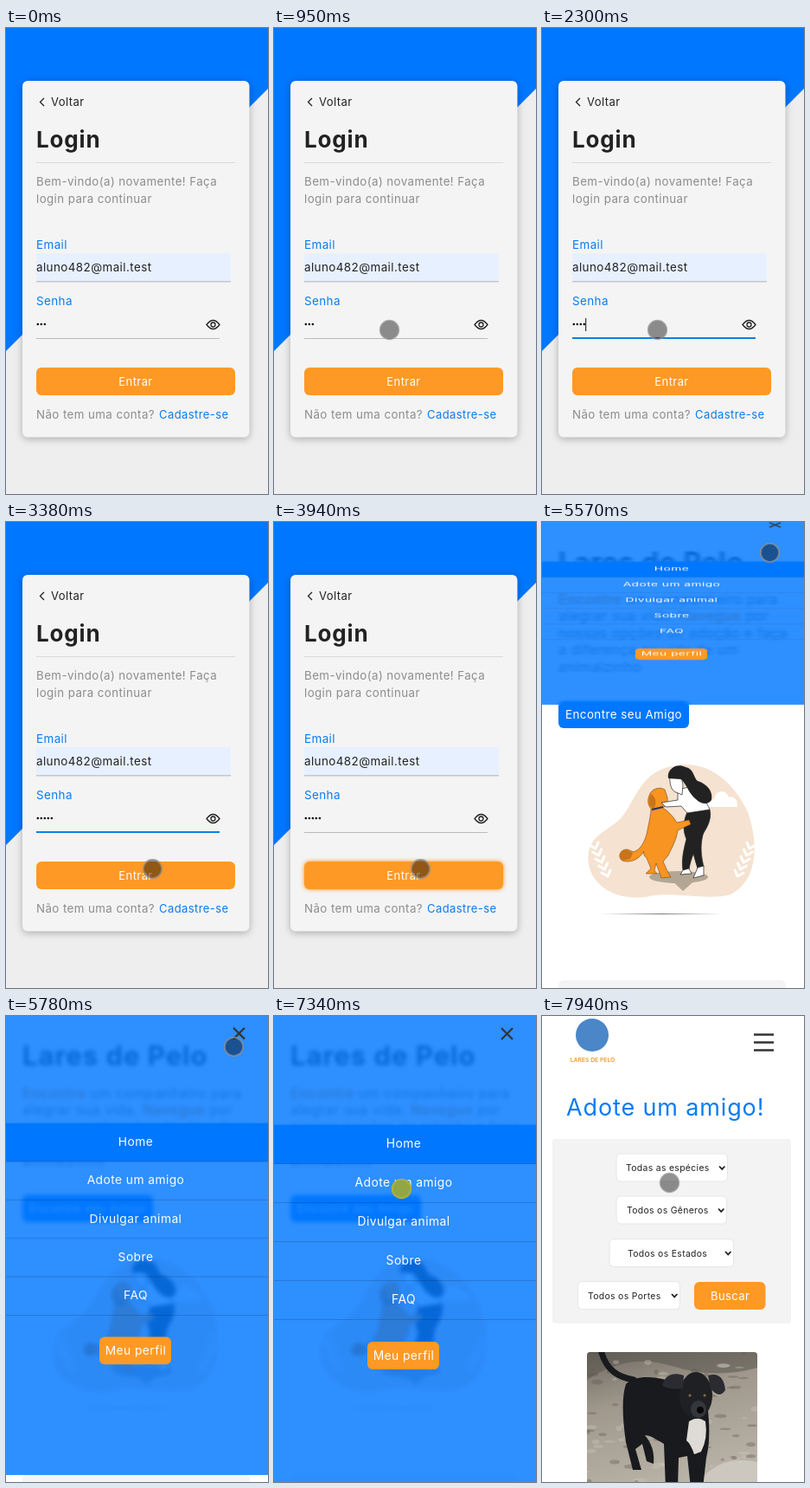
An HTML page that plays this animation: 303x538 px, repeating every 8 s.

```html
<!DOCTYPE html>
<html lang="pt">
<head>
<meta charset="utf-8">
<title>Login e menu</title>
<style>
html, body { margin: 0; width: 100%; height: 100%; overflow: hidden; background: #fff; }
#stage { position: relative; width: 303px; height: 538px; overflow: hidden; }
#stage > * { position: absolute; left: 0; top: 0; }
svg { display: block; }
text { font: 13px Inter, "Open Sans", sans-serif; letter-spacing: .032em; fill: #222; }
.m { font-size: 13.4px; }
.mid { text-anchor: middle; }
.h { font-size: 26px; font-weight: 700; }
.w { fill: #fff; }
.b { fill: #0a7bf2; }
.g { font-size: 13.3px; fill: #8c8c8c; }
.p { font-size: 16px; fill: #666; }
.p tspan { fill: #e08a20; font-weight: 600; }
.s { font-size: 10.4px; }
.o { fill: #ff9925; }
.line { fill: none; stroke: #222; stroke-width: 1.3; }
.ink { stroke: #222; stroke-width: .7; }
#menu { width: 303px; height: 538px; transform-origin: 0 0; background: rgba(0, 119, 255, .82); backdrop-filter: blur(2.5px); }
#menu text { font-size: 13.8px; }
#card { filter: drop-shadow(0 2px 4px rgba(0, 0, 0, .28)); }
</style>
</head>
<body>
<div id="stage">
<svg width="303" height="538">
  <defs>
    <linearGradient id="fade">
      <stop offset="0" stop-color="#777" stop-opacity="0"/>
      <stop offset=".5" stop-color="#777"/>
      <stop offset="1" stop-color="#777" stop-opacity="0"/>
    </linearGradient>
    <linearGradient id="ground" x2=".3" y2="1">
      <stop offset="0" stop-color="#6f6a62"/>
      <stop offset=".4" stop-color="#a0988c"/>
      <stop offset="1" stop-color="#b9b2a7"/>
    </linearGradient>
    <clipPath id="frame"><rect x="52" y="388" width="197" height="160" rx="4"/></clipPath>
  </defs>

  <g id="login">
    <rect width="303" height="538" fill="#eee"/>
    <path d="M0 0H303V70L0 373Z" fill="#07f"/>
    <rect id="card" x="19" y="61" width="262.5" height="411.5" rx="6" fill="#f4f4f4"/>
    <path class="line" d="M44 81L39.5 85.5L44 90"/>
    <text x="52" y="90">Voltar</text>
    <text class="h" x="35" y="138">Login</text>
    <rect x="35" y="155" width="230" height="1" fill="#dadada"/>
    <text class="g" x="35" y="182">Bem-vindo(a) novamente! Faça</text>
    <text class="g" x="35" y="202">login para continuar</text>
    <text class="b m" x="35" y="255">Email</text>
    <rect x="35" y="260" width="225" height="32" fill="#e7f0fe"/>
    <rect x="35" y="292" width="225" height="1.5" fill="#c6c6cc"/>
    <text class="m" x="35" y="281">aluno482@mail.test</text>
    <text class="b m" x="35" y="320">Senha</text>
    <g id="dots"></g>
    <rect id="caret" y="335" width="1" height="15" fill="#111"/>
    <rect x="35" y="358" width="212" height="1" fill="#bbb"/>
    <rect id="focus" y="357" height="2" fill="#0c7fe8"/>
    <path class="line" d="M232 342.5Q239.5 332.5 247 342.5Q239.5 352.5 232 342.5Z"/>
    <circle class="line" cx="239.5" cy="342.5" r="2.5"/>
    <rect id="enter" class="o" x="35" y="392" width="230" height="32" rx="6"/>
    <text class="w mid" x="150" y="413">Entrar</text>
    <text class="g" x="35" y="451">Não tem uma conta?</text>
    <text class="b" x="177" y="451">Cadastre-se</text>
  </g>

  <g id="home">
    <text class="h" x="19" y="57" style="font-size:31px">Lares de Pelo</text>
    <text class="p" x="19" y="95"><tspan>Encontre</tspan> um companheiro para</text>
    <text class="p" x="19" y="114">alegrar sua vida. <tspan>Navegue</tspan> por</text>
    <text class="p" x="19" y="134">nossas opções de adoção e faça</text>
    <text class="p" x="19" y="153">a diferença na vida de um</text>
    <text class="p" x="19" y="173">animalzinho</text>
    <rect x="19" y="206.5" width="151" height="31.5" rx="6" fill="#07f"/>
    <text class="w m" x="27" y="227">Encontre seu Amigo</text>
    <g id="art">
      <path fill="#f5e2d0" d="M150 282C190 272 222 300 238 335C252 375 248 415 218 430C190 438 150 425 120 433C85 437 58 420 54 395C50 365 70 360 88 345C108 327 110 290 150 282Z"/>
      <path fill="#fff" d="M190 329C188 321 196 319 199 321C199 309 214 308 216 318C222 315 227 322 226 329Z"/>
      <path id="leaves" fill="none" stroke="#fff" stroke-width="3" stroke-linecap="round"/>
      <ellipse cx="158" cy="410" rx="34" ry="7" fill="#b3a695"/>
      <path d="M148 412L163 426L180 411Z" fill="#b3a695"/>
      <path class="ink" fill="#222" d="M181 350L191 348C181 368 184 385 187 398L180 400C176 386 172 376 174 362Z"/>
      <path class="ink" fill="#222" d="M168 335L194 332C197 345 189 356 182 366C178 377 172 388 170 401L163 402C161 390 164 378 167 366C163 357 163 346 168 335Z"/>
      <path fill="#f79422" stroke="#7a4a10" stroke-width=".6" d="M124 316C126 308 136 305 142 309L145 318C146 324 143 328 140 330C146 334 152 340 156 347L170 344L172 349L157 356C155 369 149 378 146 385L140 392L146 405L149 410L138 411L132 394L130 402L133 406L120 406L126 400L121 388C118 386 117 383 118 380C112 390 102 394 93 391C87 387 90 378 98 378C102 378 104 382 108 380C116 376 120 366 122 356C124 345 126 338 126 331C122 326 122 320 124 316Z"/>
      <path fill="#c9741a" d="M126 314C122 320 123 329 129 331C133 326 132 317 126 314ZM93 391C87 387 90 378 98 378L105 382L102 389Z"/>
      <path d="M127 332L140 329" stroke="#236" stroke-width="2"/>
      <path class="ink w" d="M163 402L170 400L173 406L160 407ZM180 399L187 397L187 408L175 411Z"/>
      <path class="ink w" d="M157 309L170 306C182 313 190 322 194 332L168 336L161 328L143 329L138 324L157 321Z"/>
      <path class="ink w" d="M148 291C156 289 163 296 163 304L162 315L155 312C150 311 147 303 148 291Z"/>
      <path fill="#222" d="M146 296C144 285 156 278 166 283C176 285 175 295 180 299C190 302 198 310 196 321C192 327 184 326 178 320C170 314 168 304 161 297Z"/>
      <rect x="68" y="452" width="140" height="1" fill="url(#fade)"/>
    </g>
    <rect x="19" y="529" width="263" height="80" rx="6" fill="#f4f4f4"/>
  </g>

  <g id="adopt">
    <text class="b" x="28" y="115" style="font-size:27px">Adote um amigo!</text>
    <rect x="12" y="142" width="276" height="213" rx="4" fill="#f3f3f3"/>
    <g id="selects"></g>
    <rect class="o" x="176" y="307" width="82.5" height="32" rx="6"/>
    <text class="w" x="195" y="328">Buscar</text>
    <g id="photo" clip-path="url(#frame)">
      <rect x="52" y="388" width="197" height="160" fill="url(#ground)"/>
      <path d="M52 388H249V406Q200 420 150 404T52 420Z" fill="#55524a" opacity=".5"/>
      <g id="litter"></g>
      <path d="M180 540Q205 505 249 515V540Z" fill="#ccc8c0"/>
      <path d="M69 389C75 409 88 417 106 420" fill="none" stroke="#191a1d" stroke-width="7" stroke-linecap="round"/>
      <path fill="#191a1d" d="M97 425C110 412 140 416 166 428L192 455C194 475 194 495 190 510L186 545H172L168 508L158 510L157 545H143L141 494C131 488 125 484 119 484C128 495 130 505 129 517L121 514L116 494L108 500L115 524H105L97 492C93 465 92 440 97 425Z"/>
      <path fill="#dedbd6" d="M170 468Q180 461 189 468Q192 488 184 503L176 506Q172 494 167 490Z"/>
      <ellipse cx="178" cy="438" rx="19" ry="27" fill="#1f2023"/>
      <path fill="#2b2c31" d="M164 415C150 410 142 416 139 426C146 432 156 430 163 430ZM192 415C204 411 211 418 212 432C206 441 200 436 195 430Z"/>
      <ellipse cx="181" cy="454" rx="9" ry="10" fill="#35363b"/>
      <path d="M171 438h.1M188 438h.1" stroke="#8a6a48" stroke-width="3" stroke-linecap="round"/>
      <circle cx="183" cy="455" r="4" fill="#08080a"/>
    </g>
  </g>

  <g id="header">
    <circle cx="58" cy="22" r="19" fill="#4a86c8"/>
    <text x="58.5" y="53" class="mid" style="font-size:6.8px;font-weight:600;fill:#ee9a34;letter-spacing:0">LARES DE PELO</text>
    <path d="M245 21.5H268M245 30.5H268M245 39.5H268" stroke="#333" stroke-width="2.3"/>
  </g>
</svg>

<div id="menu"><svg width="303" height="538">
  <path d="M263 14L276 27M276 14L263 27" stroke="#333" stroke-width="2.2"/>
  <rect y="125.5" width="303" height="45" fill="#07f"/>
  <g id="items"></g>
  <rect class="o" x="108" y="376" width="83" height="32" rx="6"/>
  <text class="w mid" x="150" y="396.5">Meu perfil</text>
</svg></div>

<svg width="303" height="538"><circle id="pointer" r="10.7" stroke-width="2"/></svg>
</div>
<script>
const LOOP = 8000, HOME = 4070, MENU = 5516, ADOPT = 7470;
const $ = id => document.getElementById(id);
const set = (id, attrs) => { for (const k in attrs) $(id).setAttribute(k, attrs[k]); };
const show = (id, on) => { $(id).style.display = on ? '' : 'none'; };
const ramp = (t, from, to) => Math.min(1, Math.max(0, (t - from) / (to - from)));
const smooth = p => p * p * (3 - 2 * p);

$('items').innerHTML = ['Home', 'Adote um amigo', 'Divulgar animal', 'Sobre', 'FAQ'].map((name, i) =>
  `<text class="w mid" x="150" y="${152 + 45 * i}">${name}</text>
   <rect y="${170 + 45 * i}" width="303" height="1" fill="#000" opacity=".17"/>`).join('');

// box x, y, width, then text x
$('selects').innerHTML = [
  [86, 159, 128.5, 97, 'Todas as espécies'],
  [86, 208, 127.5, 98, 'Todos os Gêneros'],
  [78, 257.5, 143.5, 99, 'Todos os Estados'],
  [41.5, 306.5, 118, 53, 'Todos os Portes']
].map(([x, y, w, tx, name]) =>
  `<rect x="${x}" y="${y}" width="${w}" height="32" rx="5" fill="#fff" stroke="#e6e6e6"/>
   <text class="s" x="${tx}" y="${y + 20}">${name}</text>
   <path class="line" style="stroke-width:1.8" d="M${x + w - 9.5} ${y + 14.5}l3.2 3.4l3.2 -3.4"/>`).join('');

$('dots').innerHTML = [0, 1, 2, 3, 4].map(i => `<circle cx="${36.8 + 4 * i}" cy="342" r="1.25"/>`).join('');

let leaves = '';
for (const [x, dir] of [[76, -1], [226, 1]])
  for (let i = 0; i < 5; i++) {
    const cx = x + dir * i * 3.5, y = 409 - i * 8;
    leaves += `M${cx} ${y}l${dir * 7} -4M${cx} ${y}l${-dir * 3} -7`;
  }
$('leaves').setAttribute('d', leaves);

// fallen leaves and stones behind the dog
let seed = 7;
const random = () => (seed = seed * 16807 % 2147483647) / 2147483647;
$('litter').innerHTML = Array.from({ length: 110 }, () =>
  `<ellipse cx="${52 + 197 * random()}" cy="${388 + 150 * random()}" rx="${2 + 6 * random()}" ry="${1 + 2 * random()}"
    fill="${random() < .5 ? '#5c554b' : '#cfc8bc'}" opacity=".35"/>`).join('');

const track = [
  [70, 272, 550], [810, 133.5, 348.5], [2600, 133.5, 348.5], [3110, 169.5, 400.5],
  [4330, 169.5, 400.5], [5100, 263.5, 35.5], [6050, 263.5, 35.5], [6600, 160, 253],
  [6800, 160, 253], [7050, 147.5, 199.5], [7740, 147.5, 199.5], [7940, 147.5, 192.5]
];

function pointerAt(t) {
  const i = Math.max(1, track.findIndex(k => k[0] > t));
  const [a, b] = t >= track.at(-1)[0] ? track.slice(-2) : [track[i - 1], track[i]];
  const p = smooth(ramp(t, a[0], b[0]));
  return [a[1] + (b[1] - a[1]) * p, a[2] + (b[2] - a[2]) * p];
}

function drawLogin(t) {
  const count = 3 + (t >= 2300) + (t >= 2500);
  [...$('dots').children].forEach((dot, i) => { dot.style.display = i < count ? '' : 'none'; });
  const blink = t < 1500 || (t >= 1970 && t < 3000);
  show('caret', t >= 1000 && blink);
  set('caret', { x: 34.2 + 4 * count });
  const width = 212 * smooth(ramp(t, 980, 1300)) * (1 - smooth(ramp(t, 3400, 3640)));
  set('focus', { x: 141 - width / 2, width });
  $('enter').style.filter = `drop-shadow(0 0 2.5px rgba(255,140,20,${ramp(t, 3380, 3600)}))`;
}

function draw(t) {
  const open = t >= MENU && t < ADOPT;
  show('login', t < HOME);
  show('home', t >= HOME && t < ADOPT);
  show('adopt', t >= ADOPT);
  show('header', t >= HOME && !open);
  show('menu', open);
  show('photo', t >= 7740);
  drawLogin(t);

  // the page moves up when the header gives way to the menu
  set('home', { transform: `translate(0 ${open ? 0 : 70})` });
  set('art', { opacity: ramp(t, 4330, 4650) });
  const scale = 1 - (1 - ramp(t, MENU, MENU + 350)) ** 3;
  $('menu').style.transform = `translateY(${-8 * (1 - scale)}px) scaleY(${scale})`;

  const [cx, cy] = pointerAt(t);
  const pressed = t >= 7200 && t < ADOPT;
  show('pointer', t >= 70);
  set('pointer', {
    cx, cy,
    fill: pressed ? '#93a645' : 'rgba(0,0,0,.43)',
    stroke: pressed ? '#aab03c' : 'rgba(145,145,145,.7)'
  });
}

const start = performance.now();
function tick() {
  draw((performance.now() - start) % LOOP);
  requestAnimationFrame(tick);
}
tick();
</script>
</body>
</html>
```
